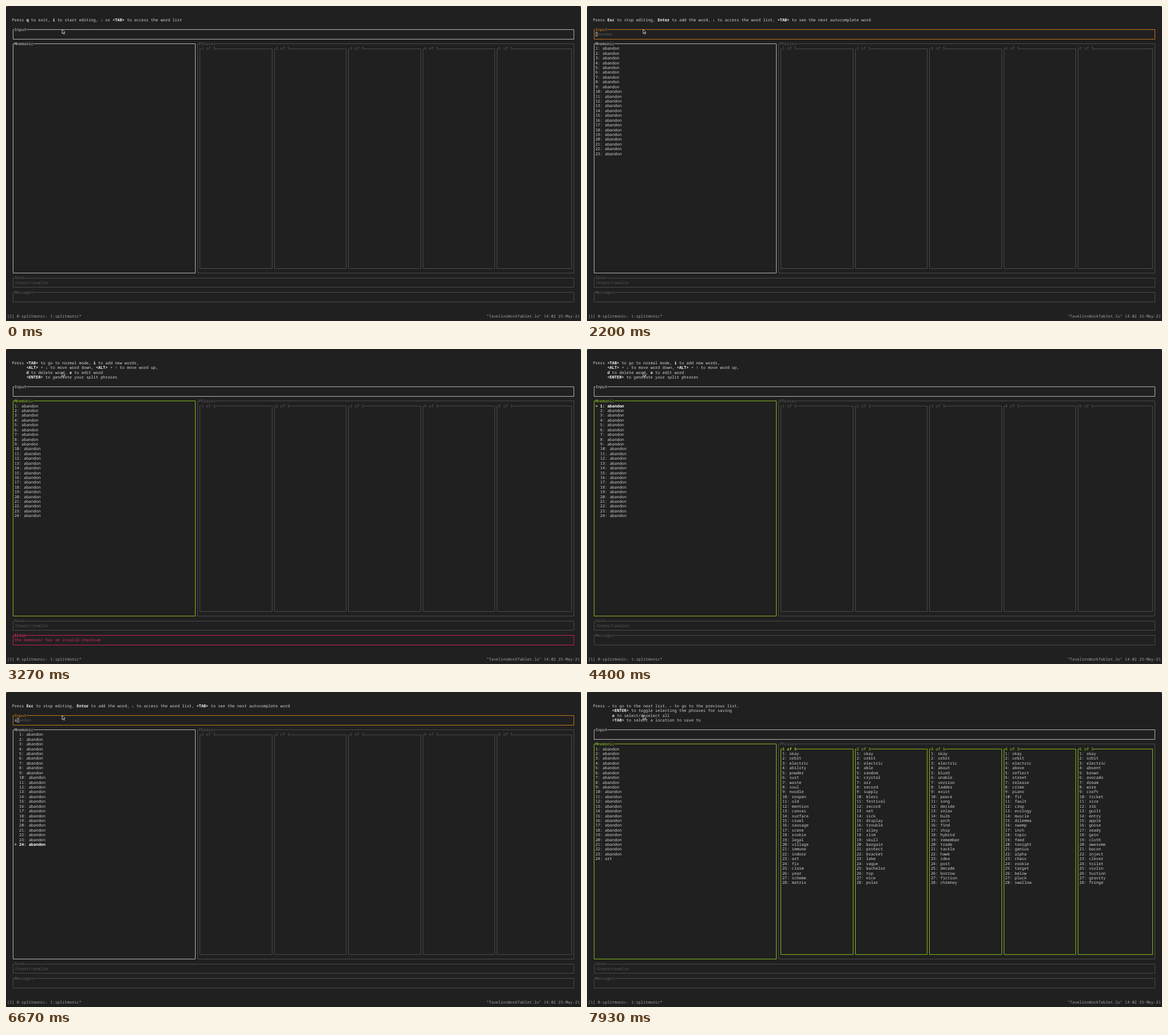
Animation, 1010 px wide and 555 px high, one loop 8000 ms. Source, as an HTML page:

```html
<!DOCTYPE html>
<html lang="en">
<head>
<meta charset="utf-8">
<title>Terminal word list</title>
<style>
  html, body { margin: 0; width: 100%; height: 100%; overflow: hidden; background: #202020; }
  svg { display: block; width: 1010px; height: 555px; }
  text {
    font: 7.015px "Noto Sans Mono", "DejaVu Sans Mono", monospace;
    text-rendering: geometricPrecision;
  }
  .b { font-weight: 700; }
</style>
</head>
<body>
<svg viewBox="0 0 1010 555">
  <rect width="1010" height="555" fill="#202020"/>
  <path d="M0 0h4Q0 0 0 4z" fill="#d8403c"/>
  <path d="M1010 0h-4q4 0 4 4z" fill="#2a86a8"/>
  <g id="screen"></g>
  <path d="M98.5 41.3v7.2l1.7-1.5 1.3 2.8 1.3-.6-1.3-2.7h2.3z" fill="#111" stroke="#e4e4e4" stroke-width=".8"/>
</svg>
<script>
const LOOP = 8000;
const CW = 4.209, RH = 8.418, X0 = 2, Y0 = 3.45;
const C = {
  text: '#d2d2d2', strong: '#f4f4f4', line: '#b4b4b4', dim: '#5c5c5c', dimLine: '#4a4a4a',
  status: '#a2a2a2', orange: '#d98420', green: '#98cf25', pink: '#e0245f'
};
const LINES = { [C.text]: C.line, [C.dim]: C.dimLine, [C.orange]: '#c2761c', [C.green]: '#86b81e', [C.pink]: '#c92056' };

const HELP = {
  normal: ['Press *q* to exit, *i* to start editing, *↓* or *<TAB>* to access the word list'],
  edit: ['Press *Esc* to stop editing, *Enter* to add the word, *↓* to access the word list, *<TAB>* to see the next autocomplete word'],
  list: [
    'Press *<TAB>* to go to normal mode, *i* to add new words,',
    '      *<ALT>* + *↓* to move word down, *<ALT>* + *↑* to move word up,',
    '      *d* to delete word, *e* to edit word',
    '      *<ENTER>* to generate your split phrases'
  ],
  phrases: [
    'Press *→* to go to the next list, *←* to go to the previous list,',
    '        *<ENTER>* to toggle selecting the phrases for saving',
    '        *a* to select/deselect all',
    '        *<TAB>* to select a location to save to'
  ]
};

const PHRASES = [
  'ability powder suit waste soul noodle reopen old mention canvas surface cruel sausage scene rookie legal village immune indoor art fix claim year scheme matrix',
  'able random crystal air record supply bless festival record net sick display trouble alley slim skull bargain protect bracket lake vague bachelor top nice polar',
  'about blush unable version ladder exist peace song decide relax bulb arch find ship hybrid remember trade tackle hawk idea post decade borrow fiction chimney',
  'above reflect street release crime piano fit fault crop ecology muscle dilemma swamp inch topic feed tonight genius alpha chaos rookie target below pluck swallow',
  'absent brown avocado dream wire craft ticket size rib guilt entry apple goose ready gain cloth awesome bacon inject clever toilet violin tuition gravity fringe'
].map(s => ('okay orbit electric ' + s).split(' '));

// Each step overrides part of the state from its time on.
const STEPS = [
  [0, { mode: 'normal', count: 0, pick: 0, typed: '', hint: '', last: 'abandon', error: false }],
  [230, { mode: 'edit', hint: 'abandon' }],
  [500, { count: 1 }],
  [1270, { count: 2 }],
  [2230, { mode: 'list', count: 24 }],
  [2270, { error: true }],
  [3400, { error: false }],
  [4400, { pick: 1 }],
  [5000, { pick: 24 }],
  [6070, { mode: 'edit', hint: 'abandon' }],
  [6600, { typed: 'a', hint: 'bandon' }],
  [6770, { typed: 'ar', hint: 'ch' }],
  [6930, { typed: 'art', hint: '' }],
  [7130, { mode: 'list', pick: 0, last: 'art' }],
  [7830, { mode: 'phrases' }]
];

function stateAt(t) {
  const s = {};
  for (const [at, change] of STEPS) if (t >= at) Object.assign(s, change);
  // Enter is held down: one more word per key repeat.
  if (t >= 1530 && t < 2230) s.count = Math.min(23, 3 + Math.floor((t - 1530) / 33.5 + 0.01));
  return s;
}

const colX = c => X0 + c * CW;
const midX = c => Math.floor(colX(c + 0.5)) + 0.5;
const midY = r => Math.floor(Y0 + (r + 0.5) * RH) + 0.5;
const esc = s => s.replace(/&/g, '&amp;').replace(/</g, '&lt;').replace(/>/g, '&gt;');

// Places every word on its own cell of the character grid.
function put(col, row, str, fill = C.text, bold = false) {
  const y = (Y0 + (row + 0.5) * RH + 2.4).toFixed(2);
  let out = '';
  for (const m of str.matchAll(/\S+/g)) {
    out += `<text x="${colX(col + m.index).toFixed(2)}" y="${y}" fill="${fill}"${bold ? ' class="b"' : ''}>${esc(m[0])}</text>`;
  }
  return out;
}

function putRich(col, row, str) {
  let out = '';
  str.split('*').forEach((part, i) => {
    const bold = i % 2 === 1;
    out += put(col, row, part, bold ? C.strong : C.text, bold);
    col += part.length;
  });
  return out;
}

function box(c1, r1, c2, r2, title, color, bold = false) {
  const x1 = midX(c1), x2 = midX(c2), y1 = midY(r1), y2 = midY(r2);
  const from = colX(c1 + 1), to = colX(c1 + 1 + title.length);
  return `<path d="M${to} ${y1}H${x2}V${y2}H${x1}V${y1}H${from}" fill="none" stroke="${LINES[color]}"/>`
    + put(c1 + 1, r1, title, color, bold);
}

function inputLine(row, typed, hint) {
  const col = 3 + typed.length;
  return put(3, row, typed)
    + `<rect x="${colX(col)}" y="${Y0 + row * RH}" width="${CW}" height="${RH}" fill="#727272"/>`
    + put(col, row, hint.slice(0, 1), '#303030')
    + put(col + 1, row, hint.slice(1), C.dim);
}

function wordList(s, row) {
  let out = '';
  for (let i = 1; i <= s.count; i++) {
    const on = i === s.pick;
    const mark = s.pick ? (on ? '> ' : '  ') : '';
    const word = i === 24 ? s.last : 'abandon';
    out += put(3, row + i, `${mark}${i}: ${word}`, on ? '#fff' : C.text, on);
  }
  return out;
}

function phraseBoxes(top, filled) {
  return PHRASES.map((words, i) => {
    const c = 80 + 31 * i;
    const end = i === 4 ? 235 : c + 30;
    const frame = box(c, top, end, 54, `${i + 1} of 5`, filled ? C.green : C.dim, filled && i === 0);
    if (!filled) return frame;
    return frame + words.map((w, j) => put(c + 1, top + 1 + j, `${j + 1}: ${w}`)).join('');
  }).join('');
}

function draw(s) {
  const help = HELP[s.mode];
  const editing = s.mode === 'edit';
  const split = s.mode === 'phrases';
  const inRow = help.length + 3;
  const top = inRow + 3;
  return help.map((line, i) => putRich(2, 2 + i, line)).join('')
    + box(2, inRow, 236, inRow + 2, 'Input', editing ? C.orange : C.text)
    + (editing ? inputLine(inRow + 1, s.typed, s.hint) : '')
    + box(2, top, 78, 55, 'Mnemonic', split || s.mode === 'list' ? C.green : C.text)
    + wordList(s, top)
    + box(79, top, 236, 55, 'Phrases', C.dim)
    + phraseBoxes(top + 1, split)
    + box(2, 56, 236, 58, 'Save', C.dim)
    + put(3, 57, '/Users/tavelin', C.dim)
    + (s.error
      ? box(2, 59, 236, 61, 'Error', C.pink, true) + put(3, 60, 'the mnemonic has an invalid checksum', C.pink)
      : box(2, 59, 236, 61, 'Messages', C.dim))
    + put(0, 64, '[1] 0:splitmonic- 1:splitmonic*', C.status)
    + put(200, 64, '"TavelinsWorkTablet.lo" 14:02 25-May-21', C.status);
}

const screenEl = document.getElementById('screen');
const start = performance.now();
let shown = '';

function tick() {
  const s = stateAt((performance.now() - start) % LOOP);
  const key = JSON.stringify(s);
  if (key !== shown) {
    shown = key;
    screenEl.innerHTML = draw(s);
  }
  requestAnimationFrame(tick);
}
tick();
</script>
</body>
</html>
```
